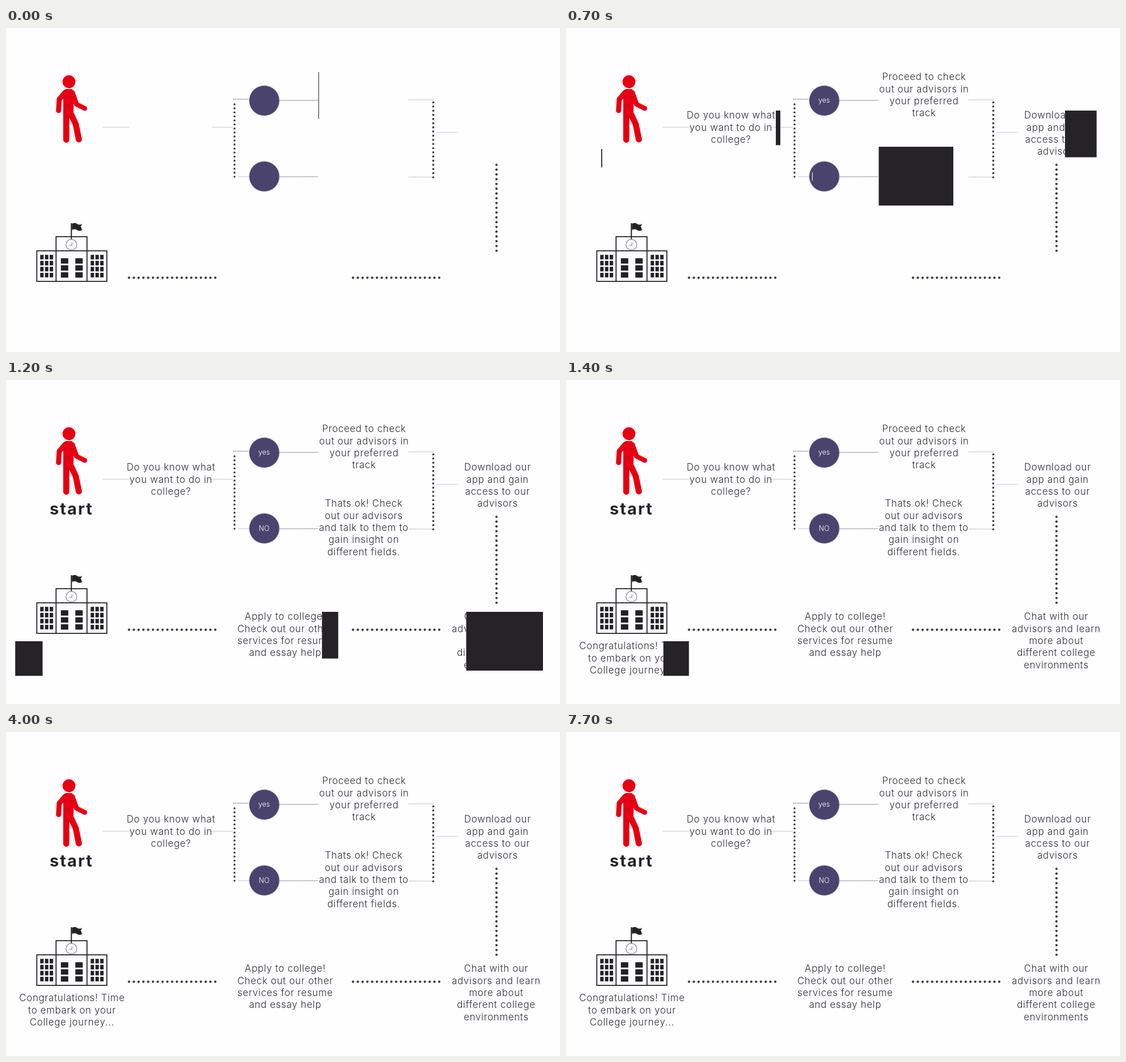
Write an HTML page that moves like this. It is 977 by 573 pixels and loops after 8 s.

```html
<!DOCTYPE html>
<html lang="en">
<head>
<meta charset="utf-8">
<title>College path flowchart</title>
<style>
  html, body { margin: 0; width: 100%; height: 100%; overflow: hidden; background: #fefdff; }
  svg { display: block; width: 977px; height: 573px; }
  text { font-family: Inter, Lato, sans-serif; text-anchor: middle; }
  .body { font-size: 16.8px; font-weight: 300; letter-spacing: .72px; fill: #2e2c30; }
  .title { font-size: 29px; font-weight: 700; letter-spacing: 2px; fill: #252326; }
  .answer { font-size: 12.5px; font-weight: 300; fill: #fff; }
  .dots { fill: none; stroke: #3a3658; stroke-linecap: round; }
  .fine { stroke: #77748a; stroke-width: 1.5; stroke-dasharray: 1.6 1.4; }
  .faint { stroke: #bdbbc3; stroke-width: 1.3; stroke-dasharray: 1.2 .8; }
  .limb { fill: none; stroke: #e60014; stroke-linecap: round; stroke-linejoin: round; }
</style>
</head>
<body>
<svg id="stage" viewBox="0 0 977 573">
  <g id="links"></g>
  <g fill="#4a436e" stroke="#d6d3df" stroke-width=".8">
    <circle cx="455.5" cy="128.5" r="26.8"/>
    <circle cx="455.5" cy="262.5" r="26.8"/>
  </g>
  <g id="walker">
    <circle cx="111" cy="95" r="11.4" fill="#e60014"/>
    <path d="M106 108H115Q119 109 120 114L119 150 114 157H101V117Q101 110 106 108Z" fill="#e60014"/>
    <path class="limb" stroke-width="9" d="M105 113L94 126 92.7 146"/>
    <path class="limb" stroke-width="8.5" d="M117 114L124.5 135 139 142.3"/>
    <path class="limb" stroke-width="10.8" d="M106.3 150V197.5M113.5 150L123 170 128.5 197"/>
  </g>
  <g id="school" transform="translate(-.7 .2)" fill="none" stroke="#232124" stroke-width="1.8">
    <path d="M55 394H178.500V448H55ZM89 448V369H143.500V448"/>
    <path d="M116 345V374" stroke-width="2"/>
    <path d="M117 346Q122 343 126 346T135 346L132.500 351 135 357Q130 360 126 357T117 357Z" fill="#232124" stroke="none"/>
    <circle cx="116" cy="383" r="9.500" fill="#fefdff" stroke="#77757a" stroke-width="1.100"/>
    <path d="M117 379V384H112" stroke="#77757a" stroke-width="1"/>
  </g>
  <g id="labels"></g>
</svg>
<script>
const LOOP = 8000, STEP = 100;
const SWEEP = 400, REVEAL_DELAY = 156;
const LINE = 21.4, DARK = '#252326';

function add(parent, name, attrs, content) {
  const node = document.createElementNS('http://www.w3.org/2000/svg', name);
  for (const key in attrs) node.setAttribute(key, attrs[key]);
  if (content) node.textContent = content;
  parent.append(node);
  return node;
}
const byId = id => document.getElementById(id);

// Nineteen round dots; each is as wide as the gap beside it
function dots(x, y, dx, dy) {
  const gap = Math.hypot(dx, dy) / 18;
  for (let i = 0; i <= 18; i++) {
    add(byId('links'), 'circle', { cx: x + dx * i / 18, cy: y + dy * i / 18, r: gap / 4, fill: '#3a3658' });
  }
}
dots(403, 135, 0, 128);
dots(753.5, 131.5, 0, 132.5);
dots(865, 242, 0, 152);
dots(217, 441.7, 152, 0);
dots(612, 441.7, 152, 0);

for (const [kind, x, y, end] of [
  ['fine', 401, 126, 429], ['fine', 483, 128, 551], ['fine', 483, 263, 550],
  ['faint', 410, 263, 429], ['faint', 170, 175.5, 217], ['faint', 363, 175.5, 400],
  ['faint', 710, 127, 755], ['faint', 710, 263.5, 752], ['faint', 759, 184.5, 797]
]) add(byId('links'), 'path', { class: kind, d: `M${x} ${y}H${end}` });

function windows(x, y, columns, rows, dx, dy, width, height) {
  for (let i = 0; i < columns * rows; i++) {
    add(byId('school'), 'rect', {
      x: x + i % columns * dx, y: y + Math.floor(i / columns) * dy,
      width, height, fill: '#232124', stroke: 'none'
    });
  }
}
windows(61, 401, 3, 4, 8.4, 10.6, 6, 8);
windows(150, 401, 3, 4, 8.4, 10.6, 6, 8);
windows(97.5, 407, 2, 3, 25.5, 12.4, 13, 9.5);

function label({ kind = 'body', start, lead = 0, x, y, width, height, baseline = 14.1, color = DARK, lines }) {
  height = height || lines.length * LINE - 3;
  const id = 'clip' + start;
  const clip = add(add(byId('labels'), 'clipPath', { id }), 'rect', { x, y: y - 6, width: 0, height: height + 14 });
  const group = add(byId('labels'), 'g', { 'clip-path': `url(#${id})` });
  lines.forEach((line, i) => add(group, 'text', {
    class: kind, x: x + width / 2, y: y + baseline + i * LINE
  }, line));
  const block = add(byId('labels'), 'rect', { y, height, fill: color });

  return time => {
    const age = time - start;
    const shown = easeExpo((age - REVEAL_DELAY) / SWEEP);
    const left = shown > .994 ? width : shown * width;
    const right = age < -lead ? 0 : Math.max(1, easeExpo(age / SWEEP) * width);
    clip.setAttribute('width', left === width ? width + 10 : left);
    block.setAttribute('x', x + left);
    block.setAttribute('width', Math.max(0, right - left));
  };
}

function easeExpo(t) {
  if (t <= 0) return 0;
  if (t >= 1) return 1;
  return t < .5 ? 2 ** (20 * t - 11) : 1 - 2 ** (9 - 20 * t);
}

const labels = [
  { start: 51, lead: 51, x: 551, y: 78, width: 161,
    lines: ['Proceed to check', 'out our advisors in', 'your preferred', 'track'] },
  { start: 125, kind: 'answer', x: 434, y: 121, width: 42.5, height: 15, baseline: 11, color: '#fff', lines: ['yes'] },
  { start: 275, x: 204, y: 146, width: 174,
    lines: ['Do you know what', 'you want to do in', 'college?'] },
  { start: 338, x: 798, y: 146, width: 138,
    lines: ['Download our', 'app and gain', 'access to our', 'advisors'] },
  { start: 470, x: 550.5, y: 210, width: 161,
    lines: ['Thats ok! Check', 'out our advisors', 'and talk to them to', 'gain insight on', 'different fields.'] },
  { start: 598, kind: 'title', x: 62, y: 214, width: 107, height: 32.5, baseline: 24, lines: ['start'] },
  { start: 650, kind: 'answer', x: 434, y: 255, width: 42.5, height: 15, baseline: 11.5, color: '#fff', lines: ['NO'] },
  { start: 810, x: 399, y: 410, width: 187,
    lines: ['Apply to college!', 'Check out our other', 'services for resume', 'and essay help'] },
  { start: 873, x: 781, y: 410, width: 167,
    lines: ['Chat with our', 'advisors and learn', 'more about', 'different college', 'environments'] },
  { start: 1021, x: 16, y: 462, width: 201,
    lines: ['Congratulations! Time', 'to embark on your', 'College journey...'] }
].map(label);

// Poses advance ten times a second
const origin = performance.now();
function draw() {
  const elapsed = (performance.now() - origin) % LOOP;
  const time = Math.floor((elapsed + 5) / STEP) * STEP % LOOP;
  for (const update of labels) update(time);
  requestAnimationFrame(draw);
}
draw();
</script>
</body>
</html>
```
